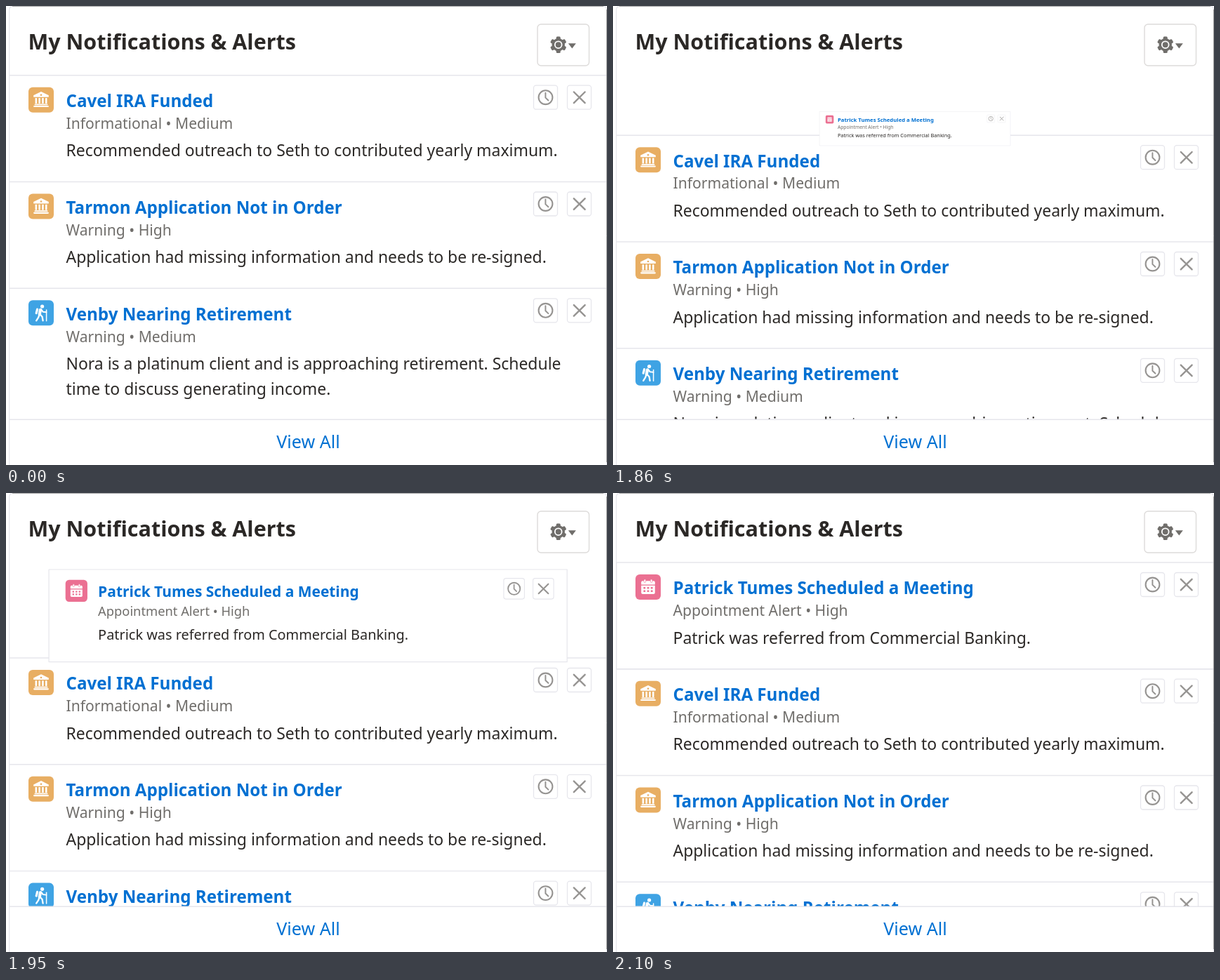
Animation of 856 by 654 pixels, one loop 2.7 s. Source, as an HTML page with a canvas:

```html
<!DOCTYPE html>
<html lang="en">
<head>
<meta charset="utf-8">
<title>Notifications</title>
<style>
  html, body { margin: 0; width: 100%; height: 100%; overflow: hidden; background: #fff; }
  canvas { display: block; }
</style>
</head>
<body>
<canvas id="stage" width="856" height="654"></canvas>
<script>
const ctx = document.getElementById('stage').getContext('2d');
const LOOP = 2700, START = 1800, STEP = 30, STEPS = 11;
const LIST_TOP = 98.7, ROW = 151.8, LIST_END = 589;
const CENTER = { x: 430, y: LIST_TOP + ROW / 2 };
const INK = '#2b2826', MUTED = '#706e6b', LINK = '#0070d2', LINE = '#e6e6ec', GLYPH = '#969492';
const ORANGE = '#e8ae63', BLUE = '#3fa3e4', PINK = '#eb7092';

const rows = [
  { icon: bank, color: ORANGE, title: 'Cavel IRA Funded', meta: 'Informational • Medium',
    body: ['Recommended outreach to Seth to contributed yearly maximum.'] },
  { icon: bank, color: ORANGE, title: 'Tarmon Application Not in Order', meta: 'Warning • High',
    body: ['Application had missing information and needs to be re-signed.'] },
  { icon: hiker, color: BLUE, title: 'Venby Nearing Retirement', meta: 'Warning • Medium',
    body: ['Nora is a platinum client and is approaching retirement. Schedule',
           'time to discuss generating income.'] }
];
const arrival = { icon: calendar, color: PINK, title: 'Patrick Tumes Scheduled a Meeting',
  meta: 'Appointment Alert • High', body: ['Patrick was referred from Commercial Banking.'] };

// cubic-bezier(1/3, 0, 0, 1), solved by bisection
function ease(u) {
  if (u <= 0) return 0;
  if (u >= 1) return 1;
  let lo = 0, hi = 1;
  for (let i = 0; i < 30; i++) {
    const s = (lo + hi) / 2;
    if ((1 - s) ** 2 * s + s ** 3 < u) lo = s; else hi = s;
  }
  return lo * lo * (3 - 2 * lo);
}

function text(str, x, y, size, color, weight = 400, align = 'left') {
  ctx.font = `${weight} ${size}px "Noto Sans", "Open Sans", sans-serif`;
  ctx.fillStyle = color;
  ctx.textAlign = align;
  ctx.fillText(str, x, y);
}

function box(x, y, w, h, r, fill, stroke, width = 1.3) {
  ctx.beginPath();
  ctx.roundRect(x, y, w, h, r);
  if (fill) { ctx.fillStyle = fill; ctx.fill(); }
  if (stroke) { ctx.strokeStyle = stroke; ctx.lineWidth = width; ctx.stroke(); }
}

function disc(x, y, r, fill) {
  ctx.beginPath();
  ctx.arc(x, y, r, 0, 7);
  ctx.fillStyle = fill;
  ctx.fill();
}

function polygon(points, fill) {
  ctx.beginPath();
  points.forEach(p => ctx.lineTo(...p));
  ctx.closePath();
  ctx.fillStyle = fill;
  ctx.fill();
}

function line(points, color, width, cap = 'butt') {
  ctx.beginPath();
  points.forEach(p => ctx.lineTo(...p));
  ctx.strokeStyle = color;
  ctx.lineWidth = width;
  ctx.lineCap = cap;
  ctx.lineJoin = 'round';
  ctx.stroke();
}

function bank(color) {
  polygon([[18, 6.3], [28.8, 11.6], [28.8, 14], [7.2, 14], [7.2, 11.6]], '#fff');
  disc(18, 11, 1.3, color);
  for (let i = 0; i < 4; i++) box(9.6 + i * 4.8, 15.2, 2.5, 8, 0.6, '#fff');
  box(8.6, 23.8, 18.8, 1.7, 0.6, '#fff');
  box(7.2, 26.2, 21.6, 2.2, 0.8, '#fff');
}

function hiker() {
  disc(19.6, 8.7, 2.6, '#fff');
  line([[12.6, 12.8], [11.2, 18.4]], '#fff', 3.2, 'round');
  line([[17, 13.6], [15.8, 20]], '#fff', 4.2, 'round');
  line([[15.6, 20.2], [14.2, 24.4], [11.2, 29]], '#fff', 2.3, 'round');
  line([[16.6, 20.2], [19.6, 23.4], [20.6, 29]], '#fff', 2.3, 'round');
  line([[18.2, 13], [20.6, 16.4], [25.4, 17]], '#fff', 2, 'round');
  line([[25.6, 13.6], [25.6, 29.4]], '#fff', 1.5, 'round');
}

function calendar(color) {
  box(8.2, 9.2, 19.6, 5.2, [2, 2, 0, 0], '#fff');
  box(8.2, 15.8, 19.6, 12.2, [0, 0, 2, 2], '#fff');
  for (const x of [12, 21.4]) box(x, 7, 2.6, 4.6, 1.2, '#fff', color, 0.6);
  for (let i = 0; i < 6; i++)
    box(11.4 + i % 3 * 5.2, 18 + Math.floor(i / 3) * 4.4, 2.8, 2.6, 0.5, color);
}

function buttons() {
  box(751.5, 14.5, 34, 34, 3.5, '#fff', LINE);
  box(799.5, 14.5, 34, 34, 3.5, '#fff', LINE);
  ctx.beginPath();
  ctx.arc(768.5, 31.5, 9.9, 0, 7);
  ctx.strokeStyle = GLYPH;
  ctx.lineWidth = 2.1;
  ctx.stroke();
  line([[768.4, 25], [768.4, 31.9], [772.4, 35.8]], GLYPH, 2, 'round');
  line([[808.8, 23.8], [824.6, 39.4]], GLYPH, 2.4, 'round');
  line([[824.6, 23.8], [808.8, 39.4]], GLYPH, 2.4, 'round');
}

// Drawn relative to the row's top edge.
function row({ icon, color, title, meta, body }) {
  ctx.save();
  ctx.translate(32, 17);
  box(0, 0, 36, 36, 6, color);
  icon(color);
  ctx.restore();
  text(title, 85.5, 45.4, 24.15, LINK, 700);
  text(meta, 85.5, 76.3, 21.1, MUTED);
  body.forEach((str, i) => text(str, 85.5, 115.6 + i * 36, 22.95, INK));
  buttons();
}

function header() {
  text('My Notifications & Alerts', 31.5, 62, 30.5, INK, 700);
  box(757, 26, 73.5, 59, 5, '#fff', '#dddbda', 1.4);
  ctx.save();
  ctx.translate(786.7, 55.2);
  for (let i = 0; i < 6; i++) {
    box(-3, -11.8, 6, 8, 1.5, MUTED);
    ctx.rotate(Math.PI / 3);
  }
  disc(0, 0, 9.2, MUTED);
  disc(0, 0, 5.8, '#fff');
  disc(0, 0, 4, MUTED);
  ctx.restore();
  polygon([[800.8, 53.3], [811.8, 53.3], [806.3, 60.6]], MUTED);
}

function list(offset) {
  ctx.save();
  ctx.beginPath();
  ctx.rect(0, 0, 856, LIST_END);
  ctx.clip();
  ctx.translate(0, LIST_TOP + offset);
  rows.forEach(item => {
    line([[5, 0], [856, 0]], LINE, 1.4);
    row(item);
    ctx.translate(0, ROW);
  });
  ctx.restore();
}

function arrivingCard(scale) {
  if (scale <= 0) return;
  ctx.save();
  ctx.translate(CENTER.x, CENTER.y);
  ctx.scale(scale, scale);
  ctx.translate(-CENTER.x, -CENTER.y + LIST_TOP + 0.3);
  box(4.8, 0, 850.7, ROW, 0, '#fff', LINE, 1.4);
  row(arrival);
  ctx.restore();
}

function draw(t) {
  const step = t < START ? -1 : Math.min(Math.floor((t - START) / STEP), STEPS - 1);
  ctx.fillStyle = '#fff';
  ctx.fillRect(0, 0, 856, 654);
  header();
  list(152 * ease((step + 1) / STEPS));
  arrivingCard(ease(step / (STEPS - 1)));
  line([[5, 589.3], [856, 589.3]], LINE, 1.4);
  text('View All', 430.5, 630, 25.1, LINK, 400, 'center');
  box(4.7, 0.3, 850.9, 660, 5, null, LINE, 1.2);
  line([[9, 0.3], [851, 0.3]], '#8a8a8a', 0.9);
  line([[855.6, 5], [855.6, 650]], '#8a8a8a', 0.9);
}

const origin = performance.now();
function tick() {
  draw((performance.now() - origin) % LOOP);
  requestAnimationFrame(tick);
}
tick();
</script>
</body>
</html>
```
